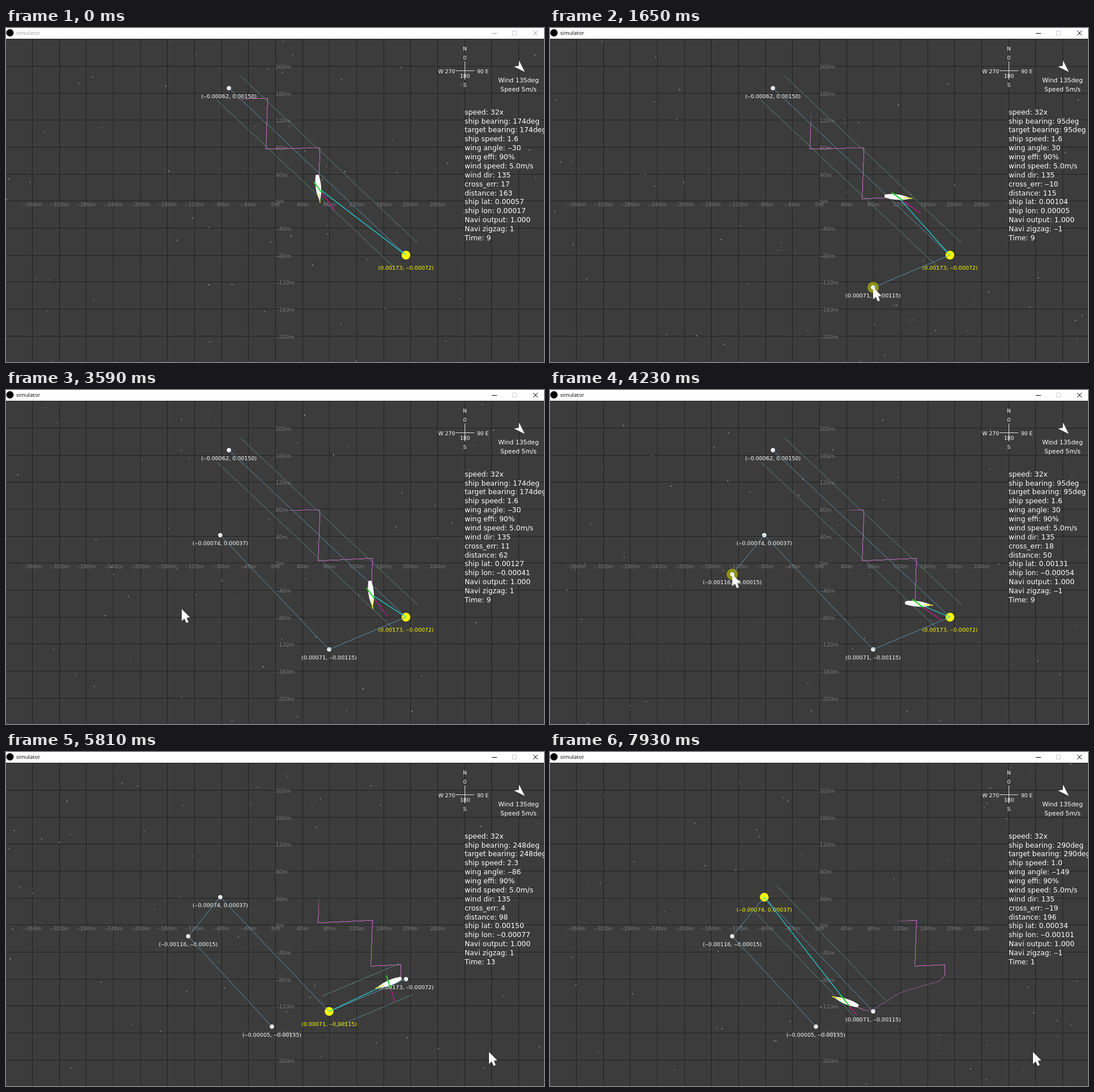
Animation, 949 px wide and 590 px high, one loop 8 s. Source, as an HTML page with a canvas:

```html
<!DOCTYPE html>
<html>
<head>
<meta charset="utf-8">
<title>simulator</title>
<style>
  html, body { margin: 0; width: 100%; height: 100%; overflow: hidden; background: #3c3c3c; }
  canvas { display: block; }
</style>
</head>
<body>
<canvas id="stage" width="949" height="590"></canvas>
<script>
const ctx = document.getElementById('stage').getContext('2d');
const LOOP = 8000, STEP = 92.2;
const CELL = 47.67, ORIGIN = { x: 476, y: 306 }, PX_PER_DEG = 132800, M_PER_PX = 40 / CELL;
const WIND_FROM = 135, WIND = 5, DRIFT = 0.3, PX_PER_SPEED = 38.8;
const TACK_MS = 90, TRAIL_MS = 6300, LANE = 29.8, CLICK_MS = 250;
const FONT = '"DejaVu Sans", sans-serif';

const RAD = Math.PI / 180;
const sin = deg => Math.sin(deg * RAD), cos = deg => Math.cos(deg * RAD);
const bearing = (dx, dy) => (Math.atan2(dx, -dy) / RAD + 360) % 360;

const at = (x, y, time = -Infinity) => ({ x, y, time });
const WAYPOINTS = [
  at(393.2, 106.3), at(705.5, 401.2), at(570, 458.3, 1560),
  at(378, 256.5, 2750), at(321.5, 325.5, 4060), at(469, 485, 4780)
];
const CLICKS = WAYPOINTS.slice(2);
const MOUSE_STOPS = [at(960, 600, 700), ...CLICKS, at(310, 387, 3600), at(852, 530, 5900)]
  .sort((a, b) => a.time - b.time);

// Upwind zigzag, then a reach round the first mark and a run from the second
const TURNS = [
  [395, 126], [461.5, 124], [458.5, 214], [554, 211], [550.6, 301.8], [646.6, 297.3], [643.6, 378.3],
  [697, 375.8], [696.7, 396], [689, 404.5], [650, 415], [617, 425.5], [575, 452], [564, 457.3],
  [552, 455.1], [507, 433.5]
];
const FIRST_TACK = 4, MARKS = [8, 13], FIRST_TACK_TIME = 360;

const boatSpeed = heading => Math.max(0.8, 2.47 * Math.abs(sin(heading - WIND_FROM)));

// Heading that holds a course against the drift, and the speed made along it
function sail(course) {
  const off = WIND_FROM + 180 - course;
  let heading = course;
  for (let i = 0; i < 8; i++)
    heading = course - Math.asin(DRIFT / boatSpeed(heading) * sin(off)) / RAD;
  return { heading, speed: boatSpeed(heading) * cos(course - heading) + DRIFT * cos(off) };
}

const log = [], arrivals = [];
let clock = 0;
TURNS.forEach(([x, y], i) => {
  if (i === 0) {
    log.push({ x, y, time: 0 });
  } else {
    const last = log[log.length - 1], dx = x - last.x, dy = y - last.y;
    const { heading, speed } = sail(bearing(dx, dy));
    if (Math.abs(heading - last.heading) > 45)
      log.push({ ...last, heading, time: clock += TACK_MS });
    clock += Math.hypot(dx, dy) / (speed * PX_PER_SPEED) * 1000;
    log.push({ x, y, heading, time: clock });
  }
  arrivals.push(clock);
});
const departure = FIRST_TACK_TIME - arrivals[FIRST_TACK];
const reached = MARKS.map(i => arrivals[i] + departure);

function logAt(t) {
  t -= departure;
  const i = Math.max(1, log.findIndex(r => r.time > t));
  const a = log[i - 1], b = log[i], u = Math.max(0, (t - a.time) / (b.time - a.time));
  return { x: a.x + (b.x - a.x) * u, y: a.y + (b.y - a.y) * u, heading: b.heading };
}

// Averaging over a short window rounds the turns
function shipAt(t, spread = 28) {
  const ship = { x: 0, y: 0, heading: 0 };
  for (let k = -3; k <= 3; k++) {
    const p = logAt(t + k * spread);
    for (const key in ship) ship[key] += p[key] / 7;
  }
  return ship;
}

function apparentWind(heading) {
  const v = boatSpeed(heading);
  const dx = WIND * sin(WIND_FROM) + v * sin(heading), dy = -WIND * cos(WIND_FROM) - v * cos(heading);
  return { from: bearing(dx, dy), force: Math.hypot(dx, dy) };
}

function random(seed) {
  return () => {
    seed = (seed + 0x6D2B79F5) | 0;
    let r = Math.imul(seed ^ (seed >>> 15), 1 | seed);
    r = (r + Math.imul(r ^ (r >>> 7), 61 | r)) ^ r;
    return ((r ^ (r >>> 14)) >>> 0) / 4294967296;
  };
}

function line(x1, y1, x2, y2, color, width = 1) {
  ctx.strokeStyle = color;
  ctx.lineWidth = width;
  ctx.beginPath();
  ctx.moveTo(x1, y1);
  ctx.lineTo(x2, y2);
  ctx.stroke();
}
function disc(x, y, r, color) {
  ctx.fillStyle = color;
  ctx.beginPath();
  ctx.arc(x, y, r, 0, 7);
  ctx.fill();
}
function shape(points, color) {
  ctx.fillStyle = color;
  ctx.beginPath();
  points.forEach(p => ctx.lineTo(p[0], p[1]));
  ctx.closePath();
  ctx.fill();
}
function text(s, x, y, size, color = '#fff', align = 'center', font = FONT) {
  ctx.font = size + 'px ' + font;
  ctx.textAlign = align;
  ctx.fillStyle = color;
  ctx.fillText(String(s).replace(/-/g, '\u2012'), x, y);
}

function drawGrid() {
  ctx.fillStyle = '#3c3c3c';
  ctx.fillRect(0, 0, 949, 590);
  const snap = v => Math.floor(v) + 0.5;
  for (let i = -9; i <= 9; i++) {
    const x = snap(ORIGIN.x - 0.5 + i * CELL), y = snap(ORIGIN.y - 0.1 + i * CELL);
    line(x, 19, x, 590, '#222');
    line(0, y, 949, y, '#222');
    if (i <= 6) text(i * 40 + 'm', x, 315, 9.5, '#7c7c7c');
    if (Math.abs(i) <= 5) text(-i * 40 + 'm', 475.5, y + 4.3, 9.5, '#7c7c7c', 'left');
  }
}

function drawStars(seed) {
  const rnd = random(seed * 7919 + 11);
  for (let i = 0; i < 55; i++) {
    ctx.fillStyle = `rgba(255,255,255,${0.4 + 0.6 * rnd()})`;
    ctx.fillRect(Math.floor(rnd() * 949), Math.floor(19 + rnd() * 571), 1.3, 1.3);
  }
}

function drawTrail(t) {
  ctx.fillStyle = '#d870d6';
  for (let age = TRAIL_MS; age > 0; age -= 18) {
    const p = shipAt(t - age);
    ctx.globalAlpha = Math.min(0.9, 0.2 + (TRAIL_MS - age) / 700);
    ctx.fillRect(Math.floor(p.x), Math.floor(p.y), 1, 1);
  }
  ctx.globalAlpha = 1;
}

const degrees = p => ({ lat: (p.x - ORIGIN.x) / PX_PER_DEG, lon: (ORIGIN.y - p.y) / PX_PER_DEG });

function drawRoute(t, leg) {
  const points = WAYPOINTS.filter((p, i) => i >= leg && t >= p.time);
  const [from, to] = points;
  const length = Math.hypot(to.x - from.x, to.y - from.y);
  const nx = -(to.y - from.y) / length * LANE, ny = (to.x - from.x) / length * LANE;
  for (const s of [-1, 1])
    line(from.x + s * nx, from.y + s * ny, to.x + s * nx, to.y + s * ny, '#56877e');

  points.forEach((p, i) => {
    const active = i === 1, color = active ? '#ff0' : '#fff', { lat, lon } = degrees(p);
    if (t - p.time < CLICK_MS) disc(p.x, p.y, 10, 'rgba(190,190,0,.65)');
    disc(p.x, p.y, active ? 7.7 : 3.7, color);
    text(`(${lat.toFixed(5)}, ${lon.toFixed(5)})`, p.x, p.y + (active ? 25.5 : 17.5), 9.5, color);
  });
  points.slice(1).forEach((p, i) => line(points[i].x, points[i].y, p.x, p.y, '#5b95b4'));
}

function drawShip(ship, target, wind) {
  line(ship.x, ship.y, target.x, target.y, '#1fe0e0', 1.2);
  ctx.save();
  ctx.translate(ship.x, ship.y);
  const wx = sin(wind.from), wy = -cos(wind.from), reach = wind.force * 7.7;
  line(0, 0, wx * reach, wy * reach, '#d8109c', 1.2);
  ctx.save();
  ctx.rotate(ship.heading * RAD);
  ctx.fillStyle = '#fff';
  ctx.beginPath();
  ctx.moveTo(-2.5, 24);
  ctx.bezierCurveTo(-6, 10, -6, -6, 0, -23);
  ctx.bezierCurveTo(6, -6, 6, 10, 2.5, 24);
  ctx.fill();
  line(0, -9, 0, -25.5, '#e8e830', 1.8);
  ctx.restore();
  line(-14 * wx, -14 * wy, 10 * wx, 10 * wy, '#1fd51f', 2);
  ctx.restore();
}

function drawCompass() {
  line(809.5, 59, 809.5, 91, '#ddd');
  line(793, 75.5, 826, 75.5, '#ddd');
  ['N', '0', , '180', 'S'].forEach((s, i) => text(s, 809.5, 39.7 + i * 16 - (i > 2 ? 0 : 0), 9.2));
  text('W 270', 792, 79.5, 9.2, '#fff', 'right');
  text('90 E', 831, 79.5, 9.2, '#fff', 'left');
  shape([[915, 77.5], [896, 68], [904.5, 67], [905, 57.5]], '#fff');
  text(`Wind ${WIND_FROM}deg`, 904, 96, 10.8);
  text(`Speed ${WIND}m/s`, 904, 112, 10.8);
}

function drawPanel(t, ship, from, to, leg, wind) {
  const dx = to.x - from.x, dy = to.y - from.y;
  const cross = (dx * (ship.y - from.y) - dy * (ship.x - from.x)) / Math.hypot(dx, dy) * M_PER_PX;
  const distance = Math.hypot(to.x - ship.x, to.y - ship.y) * M_PER_PX;
  const leftOfTarget = sin(ship.heading - bearing(to.x - ship.x, to.y - ship.y)) < -0.2;
  const { lat, lon } = degrees(ship);
  [
    'speed: 32x',
    `ship bearing: ${Math.round(ship.heading)}deg`,
    `target bearing: ${Math.round(logAt(t).heading)}deg`,
    `ship speed: ${boatSpeed(ship.heading).toFixed(1)}`,
    `wing angle: ${Math.round(wind.from - ship.heading)}`,
    'wing effi: 90%',
    `wind speed: ${WIND.toFixed(1)}m/s`,
    `wind dir: ${WIND_FROM}`,
    `cross_err: ${Math.round(cross)}`,
    `distance: ${Math.round(distance)}`,
    `ship lat: ${lat.toFixed(5)}`,
    `ship lon: ${lon.toFixed(5)}`,
    `Navi output: ${cross < 0 && distance < 100 ? '-1.000' : '1.000'}`,
    `Navi zigzag: ${leftOfTarget ? -1 : 1}`,
    `Time: ${[9, 13, 1][leg]}`
  ].forEach((s, i) => text(s, 809, 152.7 + i * 15.87, 12.4, '#fff', 'left'));
}

function drawTitleBar(active) {
  const ink = active ? '#000' : '#999';
  ctx.fillStyle = '#fff';
  ctx.fillRect(0, 0, 949, 19);
  disc(7, 8.5, 6.5, '#000');
  text('simulator', 18, 12, 9.5, ink, 'left', '"Open Sans", sans-serif');
  line(857, 9.5, 866, 9.5, ink);
  ctx.strokeStyle = '#ccc';
  ctx.strokeRect(893.5, 5.5, 7, 7);
  line(930, 5, 938, 13, ink);
  line(938, 5, 930, 13, ink);
}

// The pointer rests briefly around each stop and glides in between
function drawMouse(t) {
  const next = MOUSE_STOPS.findIndex(s => s.time > t);
  if (next === 0) return;
  const b = MOUSE_STOPS.at(next), a = next < 0 ? b : MOUSE_STOPS[next - 1];
  const u = a === b ? 1 : Math.min(1, Math.max(0, (t - a.time - 150) / (b.time - a.time - 250)));
  const e = u * u * (3 - 2 * u);
  ctx.save();
  ctx.translate(a.x + (b.x - a.x) * e, a.y + (b.y - a.y) * e);
  shape([[0, 0], [0, 21], [4.8, 16.8], [8.2, 24.5], [11.8, 23], [8.5, 15.3], [14.5, 14.8]], '#fff');
  ctx.restore();
}

function draw(now) {
  const step = Math.floor((now % LOOP + 10) / STEP), t = step * STEP;
  const leg = reached.filter(time => t >= time).length;
  const from = WAYPOINTS[leg], to = WAYPOINTS[leg + 1];
  const ship = { ...shipAt(t), heading: shipAt(t, 45).heading };
  const wind = apparentWind(ship.heading);
  drawGrid();
  drawStars(step);
  drawTrail(t);
  drawRoute(t, leg);
  drawShip(ship, to, wind);
  drawCompass();
  drawPanel(t, ship, from, to, leg, wind);
  drawTitleBar(t >= CLICKS[0].time);
  drawMouse(t);
}

let start;
function tick(now) {
  start ??= now;
  draw(now - start);
  requestAnimationFrame(tick);
}
draw(0);
requestAnimationFrame(tick);
</script>
</body>
</html>
```
